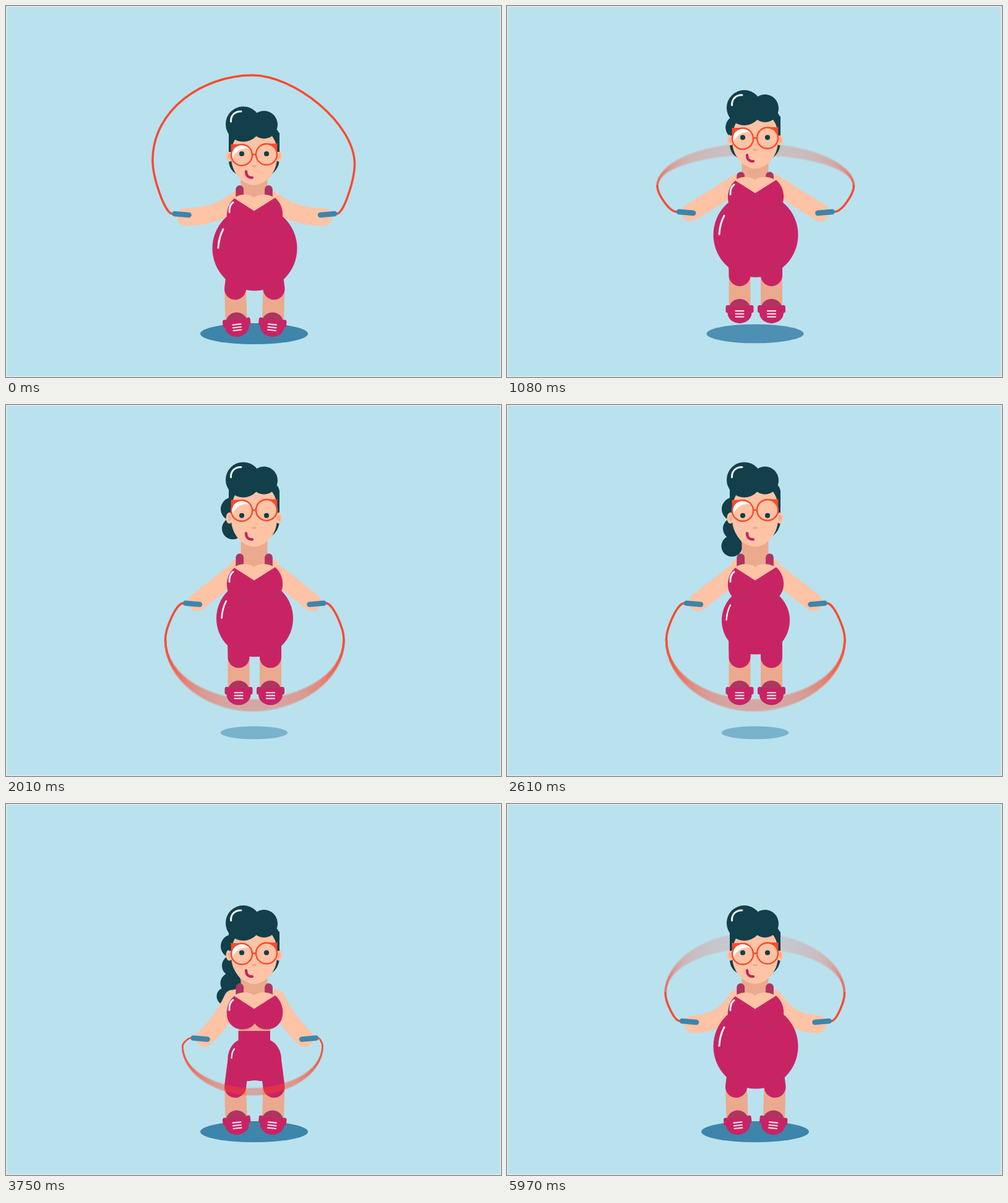
These frames come from a looping animation (800 px wide and 600 px high, 6 s). An HTML page with a canvas:

```html
<!DOCTYPE html>
<html lang="en">
<head>
<meta charset="utf-8">
<title>Jump rope</title>
<style>
html, body { margin: 0; width: 100%; height: 100%; overflow: hidden; background: #b9e2ee; }
canvas { display: block; }
</style>
</head>
<body>
<canvas id="stage" width="800" height="600"></canvas>
<script>
const g = document.getElementById('stage').getContext('2d');
const LOOP = 6000, HOP = 600, HOPS_END = 3600, AXIS = 401.75;
const SKY = '#b9e2ee', SKIN = '#ffc3a5', SHADE = '#eba98e', HAIR = '#123f4a',
  DRESS = '#c82464', DARK = '#b03361', ROPE = '#fb4a2d', BLUE = '#3d85ab', SHINE = '#f4f5f5';

const mix = (a, b, p) => a + (b - a) * p;
const clamp = v => Math.max(0, Math.min(1, v));
const wave = p => (1 - Math.cos(Math.PI * clamp(p))) / 2;
const mixAll = (a, b, p) => a.map((v, i) => mix(v, b[i], p));

function track(keys, t) {
  if (t <= keys[0][0]) return keys[0][1];
  for (let i = 1; i < keys.length; i++) {
    const [t0, a] = keys[i - 1], [t1, b] = keys[i];
    if (t <= t1) return mix(a, b, wave((t - t0) / (t1 - t0)));
  }
  return keys[keys.length - 1][1];
}

function fill(d, color) {
  g.fillStyle = color;
  g.fill(new Path2D(d));
}
function line(d, color, width, cap = 'round') {
  g.strokeStyle = color;
  g.lineWidth = width;
  g.lineCap = cap;
  g.lineJoin = 'round';
  g.stroke(new Path2D(d));
}
function oval(x, y, rx, ry, color) {
  g.fillStyle = color;
  g.beginPath();
  g.ellipse(x, y, rx, ry, 0, 0, 7);
  g.fill();
}
function ring(x, y, r, color, width) {
  g.strokeStyle = color;
  g.lineWidth = width;
  g.beginPath();
  g.arc(x, y, r, 0, 7);
  g.stroke();
}
function at(x, y, draw) {
  g.save();
  g.translate(x, y);
  draw();
  g.restore();
}
function bothSides(draw) {
  draw(false);
  g.save();
  g.translate(AXIS * 2, 0);
  g.scale(-1, 1);
  draw(true);
  g.restore();
}

// handle x, y, rope apex, bulge, bulge y, elbow dx, dy, hand dy, shoulder x, bulge lost on the right
const UP = [284, 337, 112, 32, 250, 8, 13, 4, 372, 3];
const REST = [317.5, 384.5, 507, 11.5, 408, 8, 1, -1.5, 366, 7];
const RISE = [294.5, 352, 221, 23.5, 306, 11, 20, 4, 372, 2];

function swing(t) {
  if (t < HOPS_END) {
    const u = t % HOP / HOP;
    const phase = (360 * u + 214 * u * (1 - u) ** 2.2) * Math.PI / 180;
    const apex = 308 - 196 * Math.cos(phase), speed = Math.abs(Math.sin(phase));
    const q = (apex - 112) / 374, bend = Math.max(0, 1 - 3 * q);
    return {
      arm: [284 + 17.5 * q, 337 - 15.5 * q ** 1.4, apex, 33 - 4 * q - bend, 250 + 0.346 * (apex - 112),
        8 * bend, 13 * bend, 4 - 6.5 * Math.sqrt(q), 372 + 2 * q, 3 * bend],
      front: phase > 0 && phase < 2.5,
      blur: 18 * Math.min(1, 3 * speed),
      ink: 0.25 - 0.17 * speed,
      width: 3.5
    };
  }
  if (t < 5690) {
    const p = (t - HOPS_END) / 190, speed = Math.sin(Math.PI * clamp(p));
    const arm = mixAll(UP, REST, wave(p));
    if (p > 1 && t < 4420) {
      const s = (t - 3790) / 630;
      arm[2] -= 9 * Math.sin(s * Math.PI * 3) ** 2 * (1 - s) ** 2;
    }
    return { arm, front: p > 0 && p < 0.8, blur: 18 * speed, ink: 0.25 - 0.17 * speed, width: mix(3.5, 2.5, clamp(p)) };
  }
  const p = (t - 5690) / 280;
  return {
    arm: p <= 1 ? mixAll(REST, RISE, p ** 1.6) : mixAll(RISE, UP, (p - 1) * 280 / 30),
    front: false, blur: 24 * clamp(p * 3), ink: 0.085, width: mix(2.5, 3.5, clamp(p))
  };
}

function hop(t) {
  if (t >= HOPS_END) return { lift: 0, bounce: 0 };
  const c = t % HOP, span = c < 225 ? 205 : 340;
  return {
    lift: Math.max(0, 50 * (1 - ((c - 225) / span) ** 2)),
    bounce: (c > 225 ? -8 * Math.sin(Math.PI * (c - 225) / 375) : 0) + 2 * Math.max(0, 1 - Math.abs(c - 210) / 150)
  };
}

const bellySize = [[1100, 68.5], [1250, 66.5], [1650, 66.5], [1850, 62], [2250, 62], [2450, 55],
  [2850, 55], [3050, 38], [5250, 38], [5450, 71], [5600, 68.5]];
const curls = [[366, 228.5, 19], [366.5, 260, 17.5], [363.5, 288.5, 17], [354.5, 309.5, 14]];

function drawRope({ arm, blur, ink, width }) {
  const [hx, hy, apex, bulge, bulgeY, , , , , lost] = arm;
  const x = hx - 15, y = hy - 1, topX = 398;
  // the right half sags a little when the rope is high
  const lean = clamp((220 - apex) / 108);
  const edge = right => ({
    ex: x - bulge + (right ? lost : 0),
    ey: bulgeY + (right ? 6 * lean : 0),
    sag: right ? lean : 0,
    tx: right ? AXIS * 2 - topX : topX
  });
  bothSides(right => {
    const { ex, ey } = edge(right);
    line(`M${x} ${y}C${mix(x, ex, 0.4)} ${y} ${ex} ${mix(ey, y, 0.3)} ${ex} ${ey}`, ROPE, width);
  });
  const count = blur < 1 ? 1 : 14;
  g.globalAlpha = count > 1 ? ink : 1;
  for (let i = 0; i < count; i++) {
    const top = apex + (count > 1 ? blur * (i / (count - 1) - 0.5) : 0);
    bothSides(right => {
      const { ex, ey, sag, tx } = edge(right);
      line(`M${ex} ${ey}C${ex} ${mix(ey, top, 0.61 - 0.15 * sag)} ${mix(ex, tx, 0.52 + 0.07 * sag)} ${top} ${tx} ${top}`, ROPE, width, 'butt');
    });
  }
  g.globalAlpha = 1;
}

function drawArms(arm, shoulderY) {
  const [hx, hy, , , , bx, by, dy, sx] = arm;
  const x = hx + 7, y = hy + dy;
  const cx = (sx + x) / 2 + bx, cy = (shoulderY + y) / 2 + by;
  bothSides(() => line(`M${sx} ${shoulderY}Q${cx} ${cy} ${x} ${y}`, SKIN, 29));
}

function drawLegs(air) {
  const knee = mix(370.5, 376, air), ankle = mix(372, 376, air);
  bothSides(() => {
    line(`M376 415L${knee} 457L${ankle} 508`, SHADE, 35, 'butt');
    line(`M376 415L${knee} 457.5`, DRESS, 35);
    at(mix(373, 376, air), 515, () => {
      g.rotate(mix(-0.1, 0, air));
      oval(0, -2.5, 17.5, 17, DARK);
      fill('M-22.5 -6Q-22.5 -9.5 -19 -9.5Q-15 -9.5 -13 -7H13Q15 -9.5 19 -9.5Q22.5 -9.5 22.5 -6V0Q22.5 3 19.5 3A19.5 17 0 0 1 -19.5 3Q-22.5 3 -22.5 0Z', DRESS);
      for (const y of [0, 4.7, 9.4]) line(`M-6.5 ${y}H6.5`, '#f8dfe8', 2.2);
    });
  });
}

function drawTorso(rx, bust, breath) {
  fill('M376 350H427V370H376Z', SHADE);
  fill('M375.5 367H427V382C438 387 445 400 445 412V448H410Q402 446 393.5 448H358.5V412C358.5 400 365 387 375.5 382Z', DRESS);
  const fat = rx > 42;
  if (fat) {
    at(402, 392 + (68.5 - rx) * 0.45, () => {
      g.scale(rx / 68.5, rx / 68.5);
      oval(0, 0, 68.5, 68.5, DRESS);
      line('M4 63Q32 60 50 40', DARK, 1.8);
      line('M-59 -1Q-58 -18 -51 -31', SHINE, 3);
    });
  } else {
    line('M364.5 411Q364.5 402 369 396', SHINE, 2.2);
  }
  at(0, bust, () => fill('M366 313C374 303 394 303 401 310C408 303 428 303 437 313L434 318L401 336L368 318Z', SKIN));
  at(402, 335 + bust, () => {
    const s = 1 + 0.04 * breath;
    g.scale(s, s);
    g.translate(-402, -335);
    fill('M369 311L401 331.5L435 310C445 319 448 331 447 340C445 367 413 372 402 355C391 372 358 367 357 340C356.5 328 361 318 369 311Z', DRESS);
    if (fat) {
      line('M363 355Q380 366 398 357', DARK, 1.8);
      line('M413 357Q430 364 443 350', DARK, 1.8);
    }
    line('M361 333.5Q360.5 322 367 317.5', SHINE, 3);
  });
}

function drawChest() {
  fill('M362 308Q366 297 377 300H426Q437 297 441 308L435 332H368Z', SKIN);
  fill('M379.5 225H422.5V315H379.5Z', SHADE);
  for (const x of [377.7, 424.5]) line(`M${x} 296.5V312`, DARK, 12.8);
}

function drawFace() {
  oval(361, 243, 5.5, 9, SKIN);
  oval(441, 243, 5.5, 9, SKIN);
  oval(361.5, 243, 3, 5, '#f3ae91');
  oval(441, 243, 3, 5, '#f3ae91');
  fill('M364 200V245C364 271 384 289.5 401 289.5C418 289.5 438 271 438 245V200Z', SKIN);
  oval(401, 259, 4, 1.8, SHADE);
  line('M388 267.5C388 275 392 278 398 277.5', '#bf2560', 4.2);
}

function drawHair() {
  fill('M360 236V202H380C374 212 367 214 364.5 236Z', HAIR);
  fill('M442 236V209Q440 200 435 198H422C430 213 437 214 438 236Z', HAIR);
  oval(383.5, 191, 28.5, 28.5, HAIR);
  oval(417, 192, 22, 22.5, HAIR);
  line('M363.5 187C363 177 370 170 380 170.5', SHINE, 3);
}

function drawGlasses() {
  fill('M366 247A16 16 0 0 1 394 232C385 227 370 234 366 247Z', '#fff');
  fill('M363.5 223.5H381V224A17 17 0 0 0 364 241Z', ROPE);
  fill('M438.5 222.5H421V223A17 17 0 0 1 438 240Z', ROPE);
  ring(381, 241, 17, ROPE, 2.4);
  ring(421, 240, 17, ROPE, 2.4);
  line('M398 240H404', ROPE, 2.6);
}

function draw(t) {
  const { lift, bounce } = hop(t), rope = swing(t);
  const rx = track(bellySize, t), slim = rx < 42;
  const resting = t >= HOPS_END;
  const nod = resting ? 1.5 - (t > 3930 && t < 5730 ? 4.5 * Math.sin(Math.PI * (t - 3930) / 600) ** 2 : 0) : 0;
  const breath = resting && slim ? Math.cos(Math.PI * (t - 3930) / 600) ** 2 * clamp((t - 3700) / 200) : 0;
  const bust = bounce - 4 * breath;
  const headY = nod - lift * 1.21;
  const hairY = headY - Math.max(0, lift - 25) * 0.4;

  g.fillStyle = SKY;
  g.fillRect(0, 0, 800, 600);
  g.strokeStyle = '#e4e9ea';
  g.lineWidth = 3;
  g.strokeRect(0, 0, 800, 600);

  const high = (lift / 50) ** 1.65;
  g.globalAlpha = 1 - 0.5 * high;
  oval(401, 530, 87 * (1 - 0.38 * high), 17 * (1 - 0.38 * high), BLUE);
  g.globalAlpha = 1;

  if (!rope.front) drawRope(rope);

  at(0, headY, () => {
    curls.forEach(([x, y, r], i) => {
      const born = 1030 + 600 * i, gone = 5450 - 90 * i;
      const p = clamp((t - born) / 150);
      const grown = (1 - (1 - p) ** 2) * (1 - wave((t - gone) / 130));
      const size = r * Math.min(1, 2 * grown);
      if (grown > 0) oval(x + 14 * (1 - grown), y - 13 * (1 - grown), size, size, HAIR);
    });
    fill('M360 205V253Q362 266 372 271.5H430Q440 264 442 250V205Z', HAIR);
  });

  drawArms(rope.arm, 315 - lift + bounce);
  at(0, -lift, () => {
    drawChest();
    drawLegs(clamp(lift / 10));
    drawTorso(rx, bust, breath);
  });

  at(0, headY, drawFace);
  at(0, hairY, () => {
    drawHair();
    drawGlasses();
  });
  at(0, headY, () => {
    oval(381, 239, 4.1, 4.1, HAIR);
    oval(421, 239, 4.1, 4.1, HAIR);
  });

  const [hx, hy] = rope.arm;
  bothSides(() => line(`M${hx - 11.5} ${hy - 1}L${hx + 11.5} ${hy + 1}`, BLUE, 8.6));
  if (rope.front) drawRope(rope);
}

function tick(now) {
  draw(Math.floor(now % LOOP / 30) * 30);
  requestAnimationFrame(tick);
}
draw(0);
requestAnimationFrame(tick);
</script>
</body>
</html>
```
